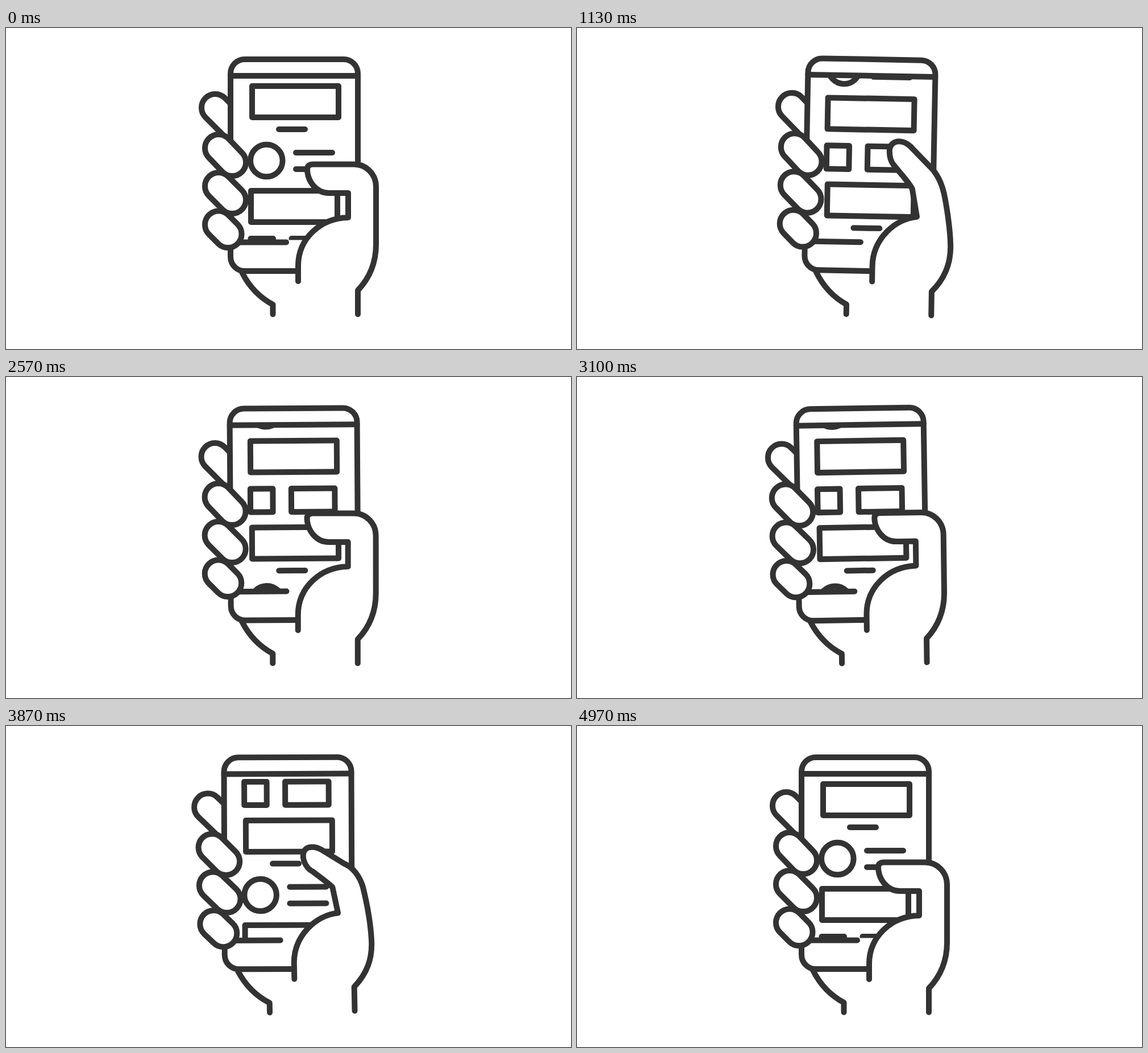
An HTML page that plays this animation: 994 px wide and 564 px high, repeating every 5010 ms.

```html
<!DOCTYPE html>
<html lang="en">
<head>
<meta charset="utf-8">
<title>Scrolling a phone</title>
<style>
html, body { margin: 0; width: 100%; height: 100%; overflow: hidden; background: #fff; }

svg {
  display: block;
  width: 100vw;
  height: 100vh;
  fill: #fff;
  stroke: #333;
  stroke-width: 10;
  stroke-linecap: round;
  stroke-linejoin: round;
}

.hand, .phone, .feed, .thumb {
  animation: 5010ms cubic-bezier(.37, 0, .63, 1) infinite;
}
.hand { transform-origin: 490px 770px; animation-name: sway; }
.phone { transform-origin: 507px 240px; animation-name: shift, tilt; }
.feed { animation-name: scroll; }

.thumb {
  --rest: path("M514 445 L514 418 C514 370 553 334 602 333 L602 290 C594 290 580 290 568 290 C545 290 530 268 530 248 C530 242 534 239.5 540 239.5 C545 239.5 550 239.5 556 239.5 L612 239.5 C634 239.5 651 257 651 279 C651 310 651 350 651 380 C651 412 639 440 619 461 L619 503");
  --reach: path("M514 445 L514 418 C514 370 553 334 598 332 L590 295 C580 296 565 297 552 298 C535 299 516 282 516 262 C516 256 518 254 524 253 C529 252 534 251 539 250 L583 242.5 C608 238 629 254 637 279 C644 310 650 345 651 376 C653 412 642 437 619 461 L619 503");
  --up: path("M514 445 L514 418 C514 370 553 334 591 330 L582 281 C577 271 560 253 549 240 C543 233 541 224 541 215 C541 205 548 198 558 198 C565 198 570 200 577 206 L617 246 C626 256 634 272 638 288 C643 310 650 350 651 380 C652 412 642 438 619 461 L619 503");
  --settle: path("M514 445 L514 418 C514 370 553 334 601 333 L599 291 C590 291 576 291 563 291 C540 291 524.5 270 524.5 250.5 C524.5 244.5 528 242 534 242 C539 241.5 545 241.5 551 241 L605 239.5 C628 239 645 257 648 279 C650 310 651 350 651 379 C652 412 639 440 619 461 L619 503");
  d: var(--rest);
  animation-name: swipe;
}

@keyframes sway {
  0%, 3%, 48.5%, 96.8%, 100% { rotate: 0deg; }
  30.5% { rotate: 1.12deg; }
  72.9% { rotate: -1.27deg; }
}
@keyframes shift {
  0%, 3%, 48.5%, 96.8%, 100% { translate: 0px; }
  30.5% { translate: 10.4px; }
  72.9% { translate: -11.8px; }
}
@keyframes tilt {
  0%, 3%, 85.8%, 100% { rotate: 0deg; }
  32.9% { rotate: 1.45deg; }
  59.9% { rotate: -.9deg; }
}
@keyframes scroll {
  0%, 12.95% { translate: 0px 0px; }
  24.53%, 70.5% { translate: 0px -174px; }
  82.42%, 100% { translate: 0px -336px; }
}
@keyframes swipe {
  0%, 5%, 42.1%, 62.87%, 99%, 100% { d: var(--rest); }
  13.77%, 71.66% { d: var(--reach); }
  22.55%, 23.95%, 80.44%, 81.84% { d: var(--up); }
  36.33%, 94.21% { d: var(--settle); }
}
</style>
</head>
<body>
<svg viewBox="0 0 994 564">
  <defs>
    <clipPath id="screen"><rect x="395" y="84" width="224" height="288.5"/></clipPath>
    <!-- one repeat of the feed, measured from the avatar's centre -->
    <g id="post">
      <circle cx="458.3" r="28.3"/>
      <path d="M510 -14 H574 M510 15 H574 M480 281 H526"/>
      <rect x="431" y="53" width="152" height="55"/>
      <rect x="430.5" y="137" width="39.5" height="41"/>
      <rect x="502.5" y="137" width="76.5" height="41"/>
      <rect x="433" y="205" width="152" height="55"/>
    </g>
  </defs>

  <g class="hand">
    <path d="M351 157 A24 24 0 0 1 385 123 L427 165 L393 199 Z"/>
    <path d="M415 429 Q434 467 469.5 486 V503"/>
  </g>

  <g class="phone">
    <rect x="395" y="55" width="224" height="372" rx="25"/>
    <g clip-path="url(#screen)">
      <g class="feed">
        <use href="#post" y="-103"/>
        <use href="#post" y="233"/>
        <use href="#post" y="569"/>
      </g>
    </g>
    <path d="M395 84 H619 M395 376.5 H493"/>
  </g>

  <g class="hand">
    <path d="M357 228 A24 24 0 0 1 391 194 L415 219 A24 24 0 0 1 381 253 Z"/>
    <path d="M357 295 A24 24 0 0 1 391 261 L415 285 A24 24 0 0 1 381 319 Z"/>
    <path d="M357 362.5 A24 24 0 0 1 391 328.5 L407.5 345 A24 24 0 0 1 373.5 379 Z"/>
    <path class="thumb"/>
  </g>
</svg>
</body>
</html>
```
